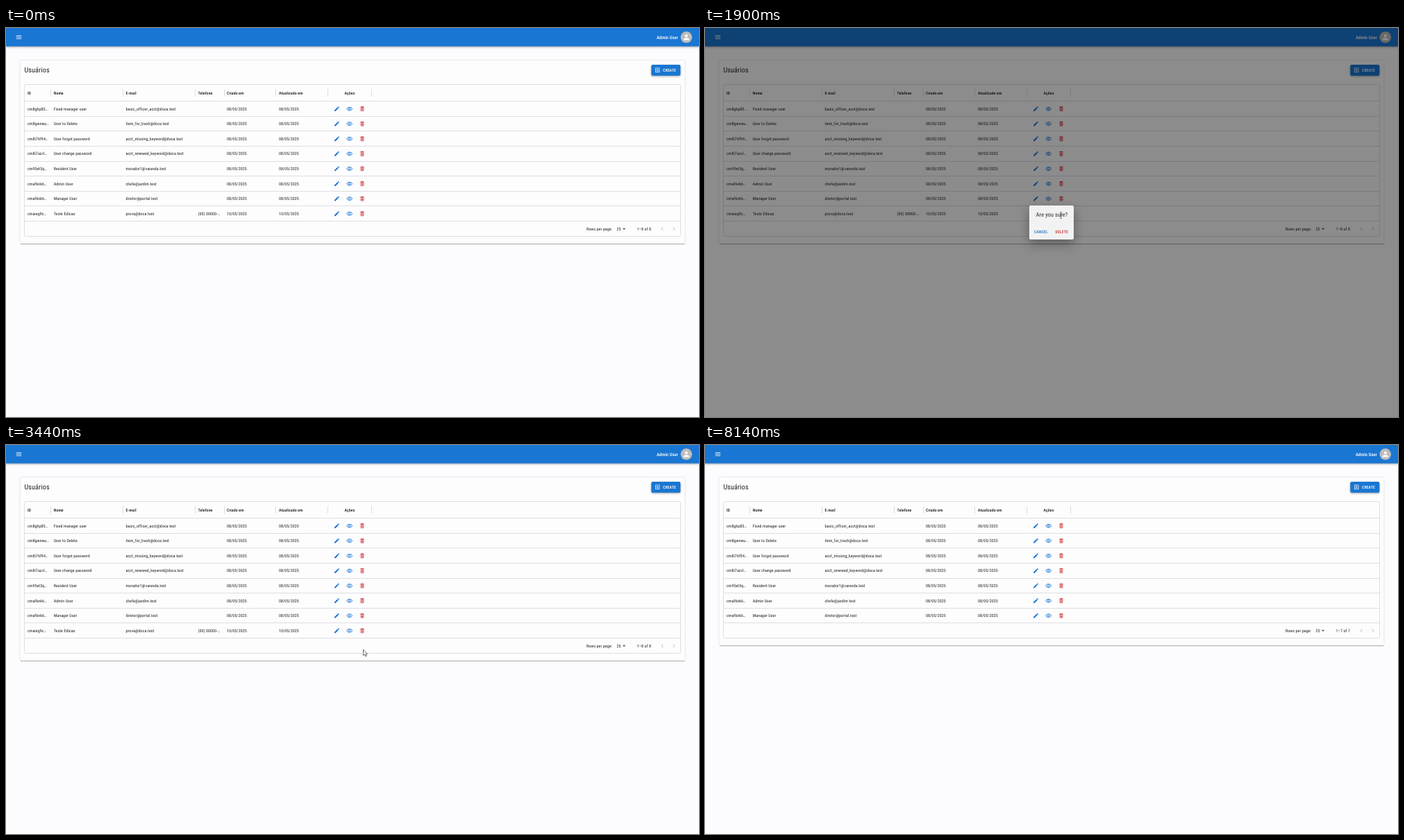
An HTML page that plays this animation: 998 by 561 pixels, repeating every 8160 ms.

```html
<!DOCTYPE html>
<html lang="pt">
<head>
<meta charset="utf-8">
<title>Usuários</title>
<style>
html, body { margin: 0; width: 100%; height: 100%; overflow: hidden; background: #fcfcfe; }
svg { display: block; width: 998px; height: 561px; }
text {
  font-family: "Roboto Condensed", Roboto, "Liberation Sans", sans-serif;
  font-stretch: 75%;
  font-size: calc(var(--s, 6px) * var(--k, 1));
  letter-spacing: var(--ls, .01em);
  text-rendering: geometricPrecision;
  fill: #212123;
  white-space: pre;
}
.med { font-weight: 500; }
.wide { font-stretch: 100%; }
.bar { filter: drop-shadow(0 1px 1.5px rgba(0,0,0,.35)); }
.card { filter: drop-shadow(0 .5px .8px rgba(0,0,0,.18)); }
.paper { filter: drop-shadow(0 6px 8px rgba(0,0,0,.38)); }
</style>
</head>
<body>
<svg id="stage" viewBox="0 0 998 561"></svg>
<script>
const LOOP = 8160;
const BLUE = '#1976d2', RED = '#d32f2f', RULE = '#dedee1';
const stage = document.getElementById('stage');

function add(tag, attrs, parent = stage) {
  const el = document.createElementNS('http://www.w3.org/2000/svg', tag);
  for (const key in attrs) el.setAttribute(key, attrs[key]);
  parent.appendChild(el);
  return el;
}
function label(x, mid, str, parent, size = 6, fill = '', cls = '', anchor = 'start') {
  const el = add('text', { x, y: mid + size * 0.355, class: cls, 'text-anchor': anchor }, parent);
  el.style.setProperty('--s', size + 'px');
  if (fill) el.style.fill = fill;
  el.textContent = str;
  return el;
}
function box(x, y, width, height, attrs, parent) {
  return add('rect', { x, y, width, height, ...attrs }, parent);
}
function line(d, stroke, parent, width = 1) {
  return add('path', { d, stroke, fill: 'none', 'stroke-width': width }, parent);
}
function icon(d, cx, cy, size, fill, parent) {
  const s = size / 24;
  return add('path', { d, fill, transform: `translate(${cx - 12 * s} ${cy - 12 * s}) scale(${s})` }, parent);
}

const ICON = {
  menu: 'M3 18h18v-2H3v2zm0-5h18v-2H3v2zm0-7v2h18V6H3z',
  person: 'M12 12c2.2 0 4-1.8 4-4s-1.8-4-4-4-4 1.8-4 4 1.8 4 4 4zm0 2c-2.7 0-8 1.3-8 4v2h16v-2c0-2.7-5.3-4-8-4z',
  plus: 'M19 3H5c-1.1 0-2 .9-2 2v14c0 1.1.9 2 2 2h14c1.1 0 2-.9 2-2V5c0-1.1-.9-2-2-2zm0 16H5V5h14v14zm-8-2h2v-4h4v-2h-4V7h-2v4H7v2h4z',
  edit: 'M3 17.25V21h3.75L17.8 9.94l-3.75-3.75L3 17.25zM20.7 7c.4-.4.4-1 0-1.4l-2.3-2.3c-.4-.4-1-.4-1.4 0l-1.9 1.8 3.75 3.75z',
  eye: 'M12 6c3.8 0 7.2 2.1 8.8 5.5-1.6 3.4-5 5.5-8.8 5.5s-7.2-2.1-8.8-5.5C4.8 8.1 8.2 6 12 6m0-2C7 4 2.7 7.1 1 11.5 2.7 15.9 7 19 12 19s9.3-3.1 11-7.5C21.3 7.1 17 4 12 4zm0 5a2.5 2.5 0 010 5 2.5 2.5 0 010-5m0-2a4.5 4.5 0 000 9 4.5 4.5 0 000-9z',
  bin: 'M14.1 10.5L12 12.6l-2.1-2.1-1.4 1.4 2.1 2.1-2.1 2.1 1.4 1.4 2.1-2.1 2.1 2.1 1.4-1.4-2.1-2.1 2.1-2.1zM15.5 4l-1-1h-5l-1 1H5v2h14V4zM6 19c0 1.1.9 2 2 2h8c1.1 0 2-.9 2-2V7H6v12zM8 9h8v10H8V9z'
};

// Without a condensed face, use smaller and tighter text.
function tuneFont() {
  const sample = 'Fixed manager user';
  const narrow = label(0, -99, sample, stage, 60);
  const normal = label(0, -99, sample, stage, 60, '', 'wide');
  normal.style.fontFamily = 'Roboto, sans-serif';
  if (narrow.getComputedTextLength() > normal.getComputedTextLength() * 0.95) {
    stage.style.setProperty('--k', 0.94);
    stage.style.setProperty('--ls', '-.03em');
  }
  narrow.remove();
  normal.remove();
}
tuneFont();

// Page
box(0, 0, 998, 561, { fill: '#fcfcfe' });
const card = box(20.5, 47, 957, 264, { fill: '#fdfdfe', rx: 2, class: 'card' });
const cardEdge = line('M21 311.5H977.5', '#adadb0');

box(0, 0, 998, 26.5, { fill: BLUE, class: 'bar' });
icon(ICON.menu, 18.5, 13.3, 10, '#fff');
label(968, 13.3, 'Admin User', stage, 6.6, '#fff', 'med', 'end');
add('circle', { cx: 979.8, cy: 13.3, r: 8.3, fill: '#bdbdbd' });
icon(ICON.person, 979.8, 13.3, 12.5, '#fff');

label(26.5, 60.5, 'Usuários', stage, 10.2);
box(929.3, 53, 42, 15.7, { fill: BLUE, rx: 2, class: 'bar' });
icon(ICON.plus, 938.2, 60.8, 8.6, '#fff');
label(946, 60.7, 'CREATE', stage, 5.9, '#fff', 'med');

// Table
const FIRST = 116.5, STEP = 21.6;
const COLS = [31, 68.7, 172.5, 276.5, 318, 393];
const rows = [
  ['cm8ghp85…', 'Fixed manager user', 'basic_officer_acct@doca.test'],
  ['cm8gwnwu…', 'User to Delete', 'item_for_trash@doca.test'],
  ['cm8i76f94…', 'User forgot password', 'acct_missing_keyword@doca.test'],
  ['cm8i7azvl…', 'User change password', 'acct_renewed_keyword@doca.test'],
  ['cm95et3q…', 'Resident User', 'morador1@varanda.test'],
  ['cmaf6nk6…', 'Admin User', 'chefe@jardim.test'],
  ['cmaf6nk6…', 'Manager User', 'diretor@portal.test'],
  ['cmaieg9c…', 'Teste Edicao', 'prova@doca.test', '(00) 00000-…', '10/05/2025']
];
const grid = box(26.5, 81.5, 945, 219, { fill: 'none', stroke: RULE, rx: 2 });
['ID', 'Nome', 'E-mail', 'Telefone', 'Criado em', 'Atualizado em']
  .forEach((name, i) => label(COLS[i], 93.6, name, stage, 5.9, '', 'med'));
label(495, 93.6, 'Ações', stage, 5.9, '', 'med', 'middle');
for (const x of [64.5, 168.5, 272.5, 314.5, 388.5, 463.5, 526.5]) line(`M${x} 88V99`, RULE);
line('M27 105.5H971', RULE);

let lastRow;
rows.forEach(([id, name, mail, phone = '', date = '08/05/2025'], i) => {
  const y = FIRST + STEP * i;
  const g = lastRow = add('g', {});
  [id, name, mail, phone, date, date].forEach((str, c) => str && label(COLS[c], y, str, g));
  icon(ICON.edit, 476.5, y, 9.2, BLUE, g);
  icon(ICON.eye, 494.7, y + 0.2, 9.2, BLUE, g);
  icon(ICON.bin, 513, y, 9.2, RED, g);
  line(`M27 ${Math.floor(127.2 + STEP * i) + 0.5}H971`, RULE, g);
});
const iconGlow = add('circle', { cx: 513, cy: 268, r: 8, fill: RED });
const focusCell = box(463.5, 235.5, 63, 21, { fill: 'none', stroke: '#8db6e2' });

const footer = add('g', {});
label(836, 290, 'Rows per page:', footer);
label(879.5, 289.7, '25', footer);
add('path', { d: 'M887.8 288.8h4.6l-2.3 2.3z', fill: '#555' }, footer);
const count = label(908.5, 290, '', footer);
line('M946.4 287.2l-2.3 2.5 2.3 2.5M960.8 287.2l2.3 2.5-2.3 2.5', '#b4b4b6', footer, 0.9);

// Dialog
const shade = box(0, 0, 998, 561, { fill: '#000' });
const dialog = add('g', {});
box(467, 256, 64, 49, { fill: '#fff', rx: 2, class: 'paper' }, dialog);
label(476.7, 269.2, 'Are you sure?', dialog, 8.4);
const cancelGlow = box(469.5, 286, 29, 15, { fill: BLUE, rx: 2 }, dialog);
const deleteGlow = box(500, 286, 28.5, 15, { fill: RED, rx: 2 }, dialog);
const ripple = add('circle', { cx: 513.5, cy: 293.5, r: 6.5, fill: RED }, dialog);
label(474, 293.6, 'CANCEL', dialog, 5.9, BLUE, 'med');
label(504.5, 293.6, 'DELETE', dialog, 5.9, RED, 'med');

// Pointer
const cursor = add('g', { 'stroke-linejoin': 'round' });
const shape = (d, fill, stroke) => add('path', { d, fill, stroke, 'stroke-width': 0.8 }, cursor);
const pointers = {
  arrow: shape('M0 0V8.6L2 6.8 3.3 9.8 4.8 9.2 3.5 6.2H6Z', '#fff', '#444'),
  hand: shape('M-1 1Q0-.8 1 1V4.5L4.5 5.3Q5.6 5.6 5.5 7L5 9.5 4.3 11H-.6L-3.2 7.4Q-3.6 6.3-2.4 6.2L-1 7.2Z', '#fff', '#333'),
  beam: shape('M-1.3-4.3H1.3M0-4.3V4.3M-1.3 4.3H1.3', 'none', '#555')
};

// Motion
const PATH = [
  [40, 530, 575], [840, 522, 338], [1480, 512.5, 267], [1840, 512.5, 267], [1900, 512.5, 270],
  [2000, 512.5, 270], [2440, 496.5, 292], [2560, 496.5, 292], [3050, 514.5, 295], [3980, 514.5, 295],
  [4820, 137, 303], [5100, 137, 303], [5680, 135, 308], [6440, 90, 347], [7100, -12, 397]
];
const KINDS = [[0, 'arrow'], [1430, 'hand'], [1860, 'beam'], [2130, 'arrow'], [2330, 'hand'], [3440, 'arrow']];
const GLOW = [[1430, 0], [1480, 0.05], [1660, 0.05], [1740, 0.16], [1900, 0.04], [1990, 0]];
const RIPPLE = [[3120, 0], [3220, 0.3], [3320, 0.26], [3430, 0]];
const OPEN = 1760, CLOSE = 3228, REMOVED = 3640, BLURRED = 5400;

const clamp = p => Math.min(1, Math.max(0, p));
const smooth = p => p * p * (3 - 2 * p);
const between = (t, a, b) => t >= a && t < b;

function sample(steps, t, ease = p => p) {
  let i = steps.findIndex(s => s[0] > t);
  if (i < 0) return steps[steps.length - 1].slice(1);
  if (i === 0) return steps[0].slice(1);
  const a = steps[i - 1], b = steps[i];
  const p = ease((t - a[0]) / (b[0] - a[0]));
  return a.slice(1).map((v, k) => v + (b[k + 1] - v) * p);
}

// cubic-bezier(.4, 0, .2, 1)
function standard(p) {
  if (p <= 0 || p >= 1) return clamp(p);
  let lo = 0, hi = 1, u = 0.5;
  for (let i = 0; i < 20; i++) {
    u = (lo + hi) / 2;
    const x = 1.2 * u * (1 - u) ** 2 + 0.6 * u * u * (1 - u) + u ** 3;
    if (x < p) lo = u; else hi = u;
  }
  return 3 * u * u * (1 - u) + u ** 3;
}

const fade = (el, v) => el.setAttribute('opacity', v);

function layout(n) {
  const lift = (8 - n) * 22;
  const move = `translate(0 ${-lift})`;
  card.setAttribute('height', 264 - lift);
  grid.setAttribute('height', 219 - lift);
  footer.setAttribute('transform', move);
  cardEdge.setAttribute('transform', move);
  fade(lastRow, n === 8 ? 1 : 0);
  count.textContent = `1–${n} of ${n}`;
}

let shown = 0;
function draw(t) {
  const n = t < REMOVED ? 8 : 7;
  if (n !== shown) layout(shown = n);
  fade(focusCell, between(t, REMOVED, BLURRED) ? 1 : 0);

  const open = standard((t - OPEN) / 225) * (1 - standard((t - CLOSE) / 195));
  fade(shade, open / 2);
  fade(dialog, open);
  fade(iconGlow, sample(GLOW, t)[0]);
  fade(cancelGlow, between(t, 2330, 2680) ? 0.04 : 0);
  fade(deleteGlow, t >= 2720 ? 0.05 : 0);
  fade(ripple, sample(RIPPLE, t)[0]);

  const [x, y] = sample(PATH, t, smooth);
  cursor.setAttribute('transform', `translate(${x} ${y})`);
  const kind = KINDS.filter(k => k[0] <= t).pop()[1];
  for (const key in pointers) fade(pointers[key], key === kind ? 1 : 0);
}

const start = performance.now();
function tick() {
  draw((performance.now() - start) % LOOP);
  requestAnimationFrame(tick);
}
tick();
</script>
</body>
</html>
```
